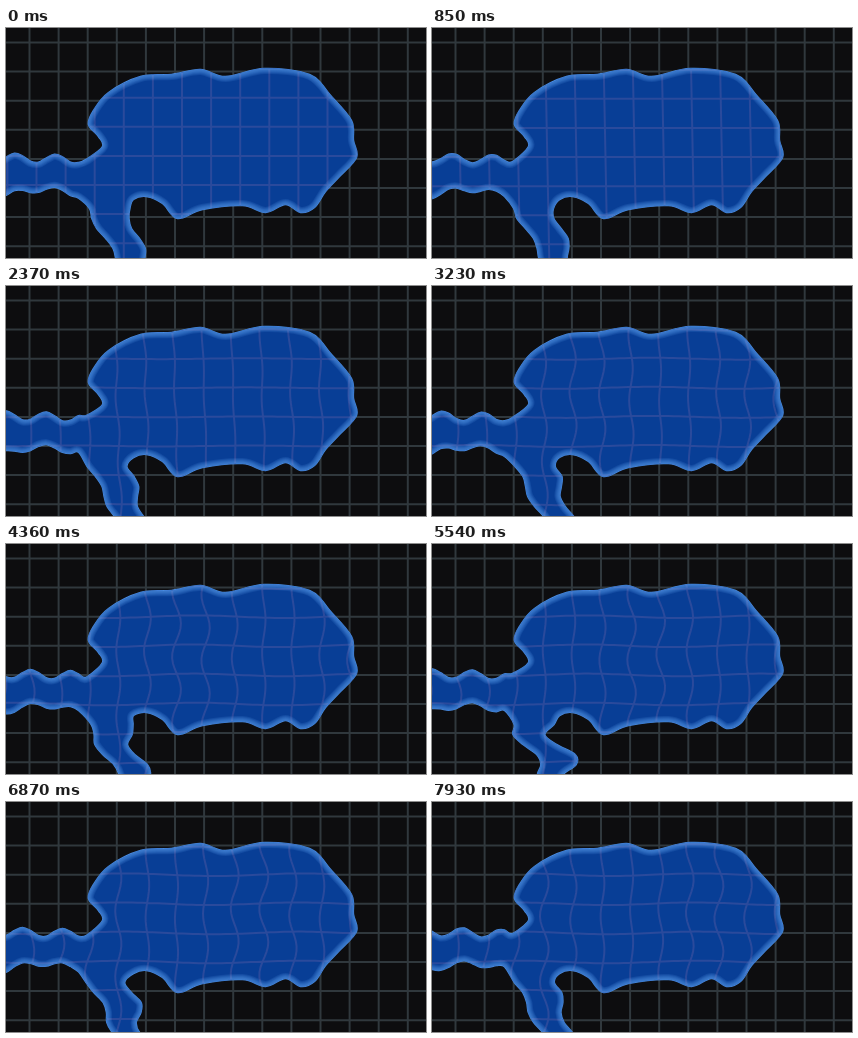
Animation of 420 by 230 pixels, one loop 8000 ms. Source, as an HTML page with a canvas:

```html
<!DOCTYPE html>
<html lang="en">
<head>
<meta charset="utf-8">
<title>Water on a grid</title>
<style>
html, body { margin: 0; width: 100%; height: 100%; overflow: hidden; background: #0d0d0f; }
canvas { display: block; }
</style>
</head>
<body>
<canvas width="420" height="230"></canvas>
<script>
const ctx = document.querySelector('canvas').getContext('2d');
const W = 420, H = 230, LOOP = 8, CELL = 29.1;
const { sin, cos, exp, min, max, PI } = Math;

// Key points of the fixed shore, clockwise from the mouth of the left stream.
const SHORE = [
  [96, 118], [92, 108], [82, 96], [87, 82], [102, 64], [134, 48], [165, 46], [194, 41],
  [219, 48], [258, 40], [303, 46], [325, 68], [345, 92], [347, 112], [350, 129],
  [333, 148], [319, 163], [308, 179], [294, 184], [279, 176], [259, 184], [236, 177],
  [196, 181], [171, 190], [156, 175], [140, 168], [127, 171]
];

const clamp = v => min(1, max(0, v));
const ease = v => clamp(v) ** 2 * (3 - 2 * clamp(v));
const crest = (distance, period) => cos(2 * PI * distance / period);
const sample = (from, to, step, point) =>
  Array.from({ length: (to - from) / step + 1 }, (_, i) => point(from + i * step));

// Both streams meander: the bends of their two banks travel towards the pond.
function outline(s) {
  const across = x => crest(x - 9 - 12.7 * s, 40);
  const down = y => crest(y - 219 + 9.2 * s, 46) * clamp((y - 168) / 20);
  const swell = exp(-(((s - 5.5) / 1.2) ** 2));

  const upper = sample(-16, 80, 8, x => [x, 129 + 2 * clamp(x / 80) - 4.5 * across(x) * clamp((92 - x) / 25)]);
  const lower = sample(-16, 72, 8, x => [x, 167 - 6 * sin(PI * clamp(x / 72)) - 3 * across(x)]);
  const left = sample(180, 250, 10, y => [82 + 0.54 * (y - 180) + (3 + 4 * swell) * down(y), y]);
  const right = sample(180, 250, 10, y => [122 + 0.32 * (y - 180) + (4 + 9 * swell) * down(y), y]);
  return [...SHORE, ...right, ...left.reverse(), ...lower.reverse(), ...upper];
}

// Closed smooth curve through all points.
function smoothPath(points) {
  const path = new Path2D(), n = points.length;
  const at = i => points[(i + n) % n];
  path.moveTo(...points[0]);
  for (let i = 0; i < n; i++) {
    const [a, b, c, d] = [at(i - 1), at(i), at(i + 1), at(i + 2)];
    path.bezierCurveTo(
      b[0] + (c[0] - a[0]) / 6, b[1] + (c[1] - a[1]) / 6,
      c[0] - (d[0] - b[0]) / 6, c[1] - (d[1] - b[1]) / 6, c[0], c[1]);
  }
  path.closePath();
  return path;
}

function grid(color, warp) {
  const line = points => points.forEach((p, i) => ctx[i ? 'lineTo' : 'moveTo'](...warp(...p)));
  ctx.strokeStyle = color;
  ctx.lineWidth = 2;
  ctx.beginPath();
  for (let x = 23 - CELL; x < W + CELL; x += CELL) line(sample(-10, H + 10, 5, y => [x, y]));
  for (let y = 14 - CELL; y < H + CELL; y += CELL) line(sample(-10, W + 10, 5, x => [x, y]));
  ctx.stroke();
}

// The grid under water is first shifted, then leans, then ripples.
function refraction(s) {
  const shift = 1 - ease(s / 2), ripple = ease((s - 1.2) / 3), lean = (1 - shift) * (1 - ripple);
  return (x, y) => {
    const bend = (3 + 1.5 * sin(x / 30 - s)) * cos((y - 78) / 10.5 + 0.6 * sin(x / 25 + 0.7 * s));
    return [
      x + 7 * shift + lean * (y - 120) * 0.05 + ripple * (1.5 + bend),
      y - 3 * shift + ripple * 1.3 * sin(x / 28 + s)
    ];
  };
}

function draw(s) {
  ctx.setTransform(1, 0, 0, 1, 0, 0);
  ctx.fillStyle = '#0d0d0f';
  ctx.fillRect(0, 0, W, H);
  ctx.translate(0.5, 0.5);
  grid('#30383d', (x, y) => [x, y]);

  const water = smoothPath(outline(s));
  ctx.strokeStyle = '#4a8ade';
  ctx.lineWidth = 1.5;
  ctx.stroke(water);
  ctx.fillStyle = '#083e96';
  ctx.fill(water);
  ctx.save();
  ctx.clip(water);
  grid('#2a4a9c', refraction(s));
  ctx.strokeStyle = 'rgba(100, 168, 245, 0.13)';
  for (let width = 11; width > 0; width -= 2) {
    ctx.lineWidth = width;
    ctx.stroke(water);
  }
  ctx.restore();
}

function tick(now) {
  draw(now / 1000 % LOOP);
  requestAnimationFrame(tick);
}
draw(0);
requestAnimationFrame(tick);
</script>
</body>
</html>
```
